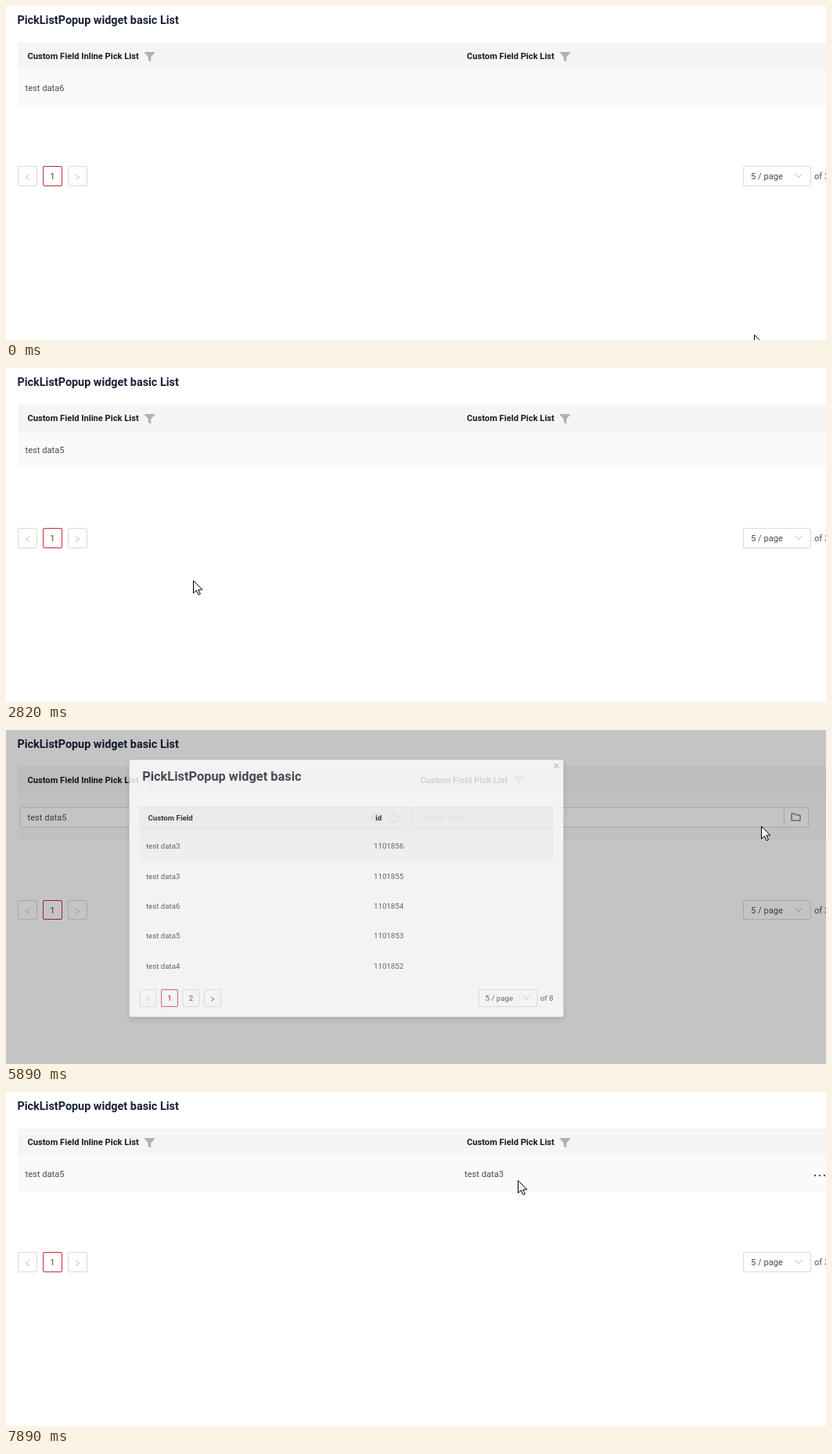
An HTML page for the animation above (7990 ms loop, 1048 px wide and 428 px high).

```html
<!DOCTYPE html>
<html lang="en">
<head>
<meta charset="utf-8">
<title>Pick list popup</title>
<style>
  html, body { margin: 0; width: 100%; height: 100%; overflow: hidden; background: #fff; }
  svg { display: block; }
  text { font: 11.15px Roboto, "Open Sans", sans-serif; fill: #4c4c4c; white-space: pre; }
  .bold { font-weight: 700; fill: #181b20; }
  .title { font-size: 14.4px; fill: #172033; }
  .big { font-size: 18.9px; fill: #2b303c; }
  .hint { fill: #bfbfbf; }
  .mid { text-anchor: middle; }
  .box { fill: #fff; stroke: #d9d9d9; }
  .line { fill: none; stroke: #666; }
</style>
</head>
<body>
<svg id="stage" width="1048" height="428" viewBox="0 0 1048 428"></svg>
<script>
const LOOP = 7990;
const stage = document.getElementById('stage');

const text = (x, y, s, cls = '', extra = '') =>
  `<text x="${x}" y="${y}" class="${cls}" ${extra}>${s}</text>`;
const rect = (x, y, w, h, fill, extra = '') =>
  `<rect x="${x}" y="${y}" width="${w}" height="${h}" fill="${fill}" ${extra}/>`;
const box = (x, y, w, h, extra = '') =>
  `<rect x="${x + .5}" y="${y + .5}" width="${w - 1}" height="${h - 1}" rx="1.5" class="box" ${extra}/>`;
const line = (d, color, extra = '') =>
  `<path d="${d}" class="line" style="stroke:${color}" ${extra}/>`;
const group = (id, body) => `<g id="${id}">${body}</g>`;

const funnel = x => `<path d="M${x} 59h13v1l-4.7 5.2v6.6l-3.6-2.2v-4.4l-4.7-5.2z" fill="#b0b0b0"/>`;
const folder = (x, y, color) =>
  line(`M${x - 5.5} ${y - 4.5}h4l1.5 2h5.5v7h-11z`, color, 'stroke-linejoin="round"');
const chevron = (x, y, dir, color) =>
  line(`M${x - 2.5 * dir} ${y - 3}l${5 * dir} 3l${-5 * dir} 3`, color);

function pager({ x, y, h, step, pages, selectX, total, active = '' }) {
  let out = box(x, y, 25, h) + chevron(x + 12.5, y + 14.5, -1, '#c4c4c4');
  for (let i = 1; i <= pages; i++) {
    const left = x + step * i;
    out += box(left, y, 25, h, i === 1 ? 'style="stroke:#c8283a"' : '') +
      text(left + 12.5, y + 16.5, i, 'mid', i === 1 ? `style="${active}"` : '');
  }
  const next = x + step * (pages + 1);
  out += box(next, y, 25, h) + chevron(next + 12.5, y + 14.5, 1, pages > 1 ? '#555' : '#c4c4c4');
  out += box(selectX, y, 87, h) + text(selectX + 10, y + 17, '5 / page') +
    line(`M${selectX + 67} ${y + 10}l4 5l4 -5`, '#bbb');
  return out + text(selectX + 91, y + 17, `of ${total}`);
}

const header = x => text(x, 68, 'Custom Field Pick List', 'bold') + funnel(x + 119);
const listPager = (y, h) => pager({ x: 15, y, h, step: 32, pages: 1, selectX: 942, total: 3 });

const viewMode =
  rect(15, 82, 1033, 46, '#f9faf9') + header(589) +
  text(24.5, 109, '', '', 'id="value1"') + text(586, 109, '', '', 'id="value2"') +
  listPager(205, 26);

const editMode =
  rect(15, 82, 1033, 59, '#f9faf9') + header(529.5) +
  box(18, 99, 496, 26, 'id="input1"') + text(27.5, 116, '', '', 'id="edit1"') +
  '<circle cx="472.5" cy="112" r="5" class="line"/>' +
  line('M470.5 110l4 4m0 -4l-4 4', '#666') + folder(496.5, 112.5, '#999') +
  box(520, 99, 506, 26) + box(520, 99, 475, 26, 'id="input2"') +
  text(529.5, 116, 'Select value', 'hint') + folder(1009.5, 111.5, '#4c4c4c') +
  listPager(218, 25);

const ROWS = [['test data3', 1101856], ['test data3', 1101855], ['test data6', 1101854],
  ['test data5', 1101853], ['test data4', 1101852]];
const ROW_TOP = 117, ROW_H = 44.4;

const popup =
  rect(115, 11.5, 640, 380, '#fff', 'rx="2" filter="url(#shadow)"') +
  text(134, 43, 'PickListPopup widget basic', 'bold big') +
  line('M741.5 17l7 7m0 -7l-7 7', '#777') +
  rect(130, 81, 610.5, 36, '#f4f4f4') +
  text(142.5, 101, 'Custom Field', 'bold') + text(478, 101, 'id', 'bold') +
  rect(130, ROW_TOP, 610.5, ROW_H, '#f8f8f8') +
  rect(130, ROW_TOP, 610.5, ROW_H, '#fafafa', 'id="hover"') +
  ROWS.map(([name, id], i) => {
    const y = ROW_TOP + ROW_H * i + 26;
    return text(139.5, y, name) + text(475.5, y, id);
  }).join('') +
  pager({ x: 130, y: 351, h: 26, step: 31.7, pages: 2, selectX: 630, total: 8,
    active: 'fill:#b8283a;font-weight:500' });

stage.innerHTML =
  `<defs><filter id="shadow" x="-10%" y="-10%" width="120%" height="120%">
    <feDropShadow dx="0" dy="3" stdDeviation="4" flood-opacity=".18"/></filter></defs>` +
  text(14.5, 23, 'PickListPopup widget basic List', 'bold title') +
  rect(15, 47, 1033, 35, '#f5f5f5') +
  text(27.5, 68, 'Custom Field Inline Pick List', 'bold') + funnel(177) +
  group('view', viewMode) + group('edit', editMode) +
  group('dots', '<circle cx="1040" cy="106.5" r="10" fill="#fff"/>' +
    [1034, 1040, 1046].map(x => `<circle cx="${x}" cy="107" r="1.2" fill="#555"/>`).join('')) +
  rect(0, 0, 1048, 428, '#000', 'id="mask"') +
  group('popup', popup) +
  group('arrow', '<path d="M.5 .5v16l3.8 -3.6l2.7 5.8l2.4 -1.1l-2.7 -5.6h5.1z" fill="#fff" stroke="#000"/>') +
  group('beam', line('M-3 -6.5h2.2l.8 .8l.8 -.8h2.2M0 -6v13M-3 7.5h2.2l.8 -.8l.8 .8h2.2', '#000'));

const el = {};
stage.querySelectorAll('[id]').forEach(node => el[node.id] = node);

// Pointer stops: time, x, y
const PATH = [
  [0, 957, 422], [200, 720, 270], [420, 443, 104], [680, 443, 108], [1000, 455, 112],
  [1470, 504, 107], [1640, 503, 107], [2270, 330, 302], [2330, 330, 302], [2590, 239, 272],
  [3050, 239, 272], [3830, 471, 112], [4180, 590, 167], [4620, 772, 110], [4690, 765, 108],
  [4870, 765, 112], [4990, 834, 124], [5660, 1005, 107], [5760, 1005, 107], [6010, 928, 138],
  [6540, 420, 258], [6570, 420, 258], [7070, 250, 180], [7230, 250, 180], [7890, 654, 113],
  [LOOP, 654, 113]
];
const SESSIONS = [
  { edit: 680, show: 1510, start: 1435, close: 2790 },
  { edit: 4870, show: 5790, start: 5769, close: 7230 }
];

const clamp = v => Math.max(0, Math.min(1, v));
const smooth = v => v * v * (3 - 2 * v);
const show = (node, on) => node.setAttribute('display', on ? 'inline' : 'none');

function pointerAt(t) {
  const i = Math.max(1, PATH.findIndex(stop => stop[0] > t));
  const [t0, x0, y0] = PATH[i - 1], [t1, x1, y1] = PATH[i];
  const p = (t - t0) / (t1 - t0);
  return [x0 + (x1 - x0) * p, y0 + (y1 - y0) * p];
}

function popupAt(t, s) {
  if (t >= s.close) return { scale: .92, alpha: .45, dim: .2 };
  if (t < s.show) return null;
  const p = clamp((t - s.start) / 300);
  return {
    scale: 1 - .8 * (1 - p) ** 3.43,
    alpha: 1 - (1 - p) ** 3.2,
    dim: .45 * smooth(clamp(p / .8))
  };
}

function render(t) {
  const session = SESSIONS.find(s => t >= s.edit && t < s.close + 30);
  const editing = !!session && t < session.close;
  const modal = session ? popupAt(t, session) : null;
  const [x, y] = pointerAt(t);

  show(el.view, !editing);
  show(el.edit, editing);
  const first = t < SESSIONS[0].close ? 'test data6' : 'test data5';
  el.value1.textContent = el.edit1.textContent = first;
  el.value2.textContent = t < SESSIONS[1].close ? '' : 'test data3';
  [el.input1, el.input2].forEach((input, i) => {
    input.style.stroke = session === SESSIONS[i] && !modal ? '#5baee3' : '#d9d9d9';
  });
  show(el.dots, !modal && y > 82 && y < (editing ? 141 : 128));

  show(el.mask, modal);
  show(el.popup, modal);
  if (modal) {
    el.mask.setAttribute('opacity', modal.dim);
    el.popup.setAttribute('opacity', modal.alpha);
    el.popup.setAttribute('transform',
      `translate(435 211) scale(${modal.scale}) translate(-435 -211)`);
    const row = Math.floor((y - ROW_TOP) / ROW_H);
    show(el.hover, row > 0 && row < ROWS.length && x > 130 && x < 740);
    el.hover.setAttribute('y', ROW_TOP + ROW_H * row);
  }

  const typing = editing && !modal && y > 99 && y < 125 &&
    ((x > 18 && x < 464) || (x > 520 && x < 994));
  show(el.arrow, !typing);
  show(el.beam, typing);
  const place = `translate(${Math.round(x)} ${Math.round(y)})`;
  el.arrow.setAttribute('transform', place);
  el.beam.setAttribute('transform', place + ' translate(.5 0)');
}

const began = performance.now();
function tick() {
  render((performance.now() - began) % LOOP);
  requestAnimationFrame(tick);
}
tick();
</script>
</body>
</html>
```
